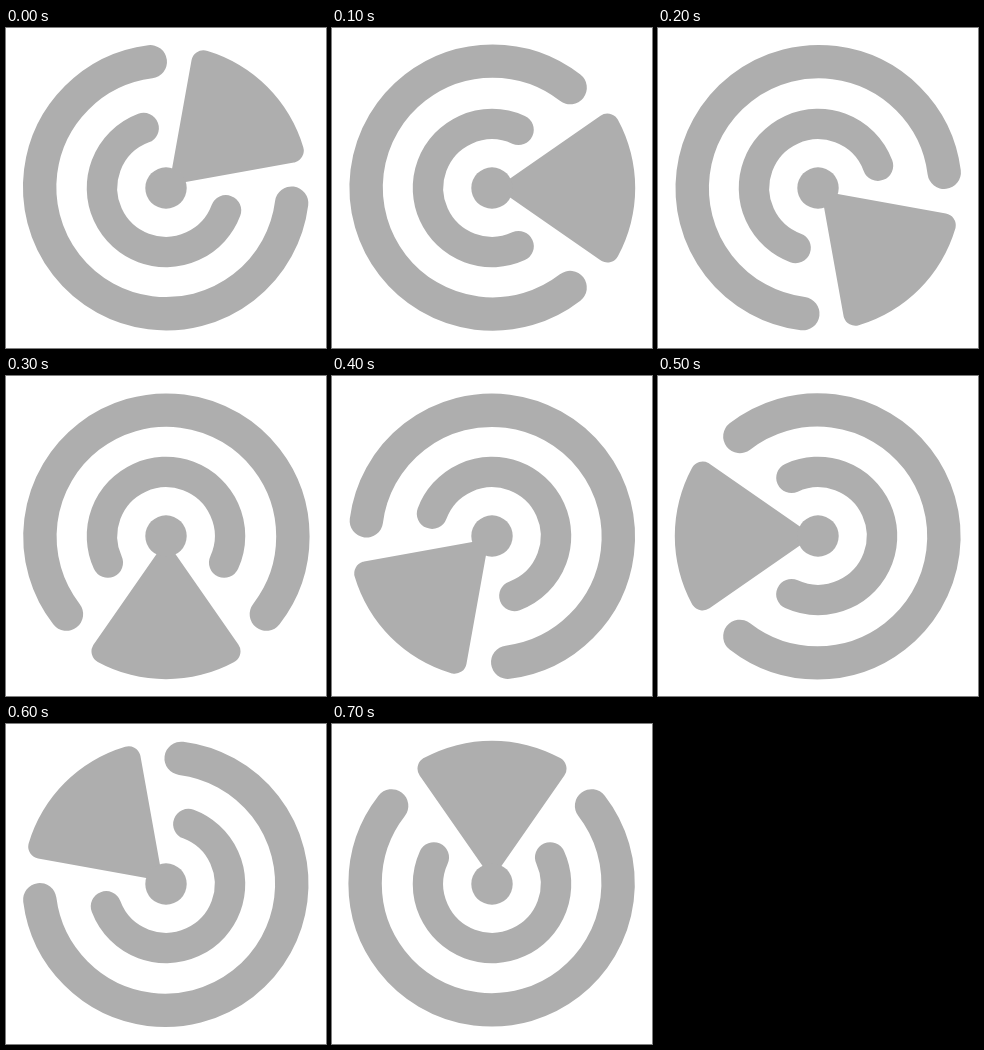
Animation of 320 by 320 pixels, one loop 800 ms. Source, as an HTML page with a canvas:

```html
<!DOCTYPE html>
<html lang="en">
<head>
<meta charset="utf-8">
<title>Radar loader</title>
<style>
  html, body { margin: 0; width: 100%; height: 100%; overflow: hidden; background: #fff; }
  canvas { display: block; width: 320px; height: 320px; }
</style>
</head>
<body>
<canvas id="stage"></canvas>
<script>
const SIZE = 320;
const STEPS = 8;
const STEP_MS = 100;
const COLOR = '#aeaeae';

const canvas = document.getElementById('stage');
const ctx = canvas.getContext('2d');
const dpr = window.devicePixelRatio || 1;
canvas.width = canvas.height = SIZE * dpr;

const rad = deg => deg * Math.PI / 180;

// Open ring with round ends; the gap is centred on the +x axis.
function ring(x, y, radius, width, halfGap) {
  ctx.lineWidth = width;
  ctx.beginPath();
  ctx.arc(x, y, radius, rad(halfGap), rad(360 - halfGap));
  ctx.stroke();
}

// Sector pointing along +x with two rounded outer corners.
function wedge(apex, halfAngle, radius, corner, cornerAngle) {
  const a = rad(cornerAngle);
  const normal = rad(90 + halfAngle);
  const d = radius - corner;
  const x = d * Math.cos(a);
  const y = d * Math.sin(a);
  ctx.beginPath();
  ctx.moveTo(apex, 0);
  ctx.arc(x, -y, corner, -normal, -a);
  ctx.arc(0, 0, radius, -a, a);
  ctx.arc(x, y, corner, a, normal);
  ctx.closePath();
  ctx.fill();
}

function dot(radius) {
  ctx.beginPath();
  ctx.arc(0, 0, radius, 0, 2 * Math.PI);
  ctx.fill();
}

function draw(time) {
  const step = Math.floor(time / STEP_MS) % STEPS;
  ctx.setTransform(dpr, 0, 0, dpr, 0, 0);
  ctx.fillStyle = '#fff';
  ctx.fillRect(0, 0, SIZE, SIZE);
  ctx.translate(SIZE / 2, SIZE / 2);
  ctx.rotate(rad(45 * (step - 1)));
  ctx.fillStyle = ctx.strokeStyle = COLOR;
  ctx.lineCap = 'round';
  // The outer ring sits slightly off the pivot.
  ring(0.6, -0.4, 126.5, 33.4, 52.2);
  ring(0, 0, 64, 30.5, 65.5);
  wedge(4.4, 34.8, 143.2, 12, 28.45);
  dot(20.7);
}

const start = performance.now();
function tick() {
  draw(performance.now() - start);
  requestAnimationFrame(tick);
}
tick();
</script>
</body>
</html>
```
